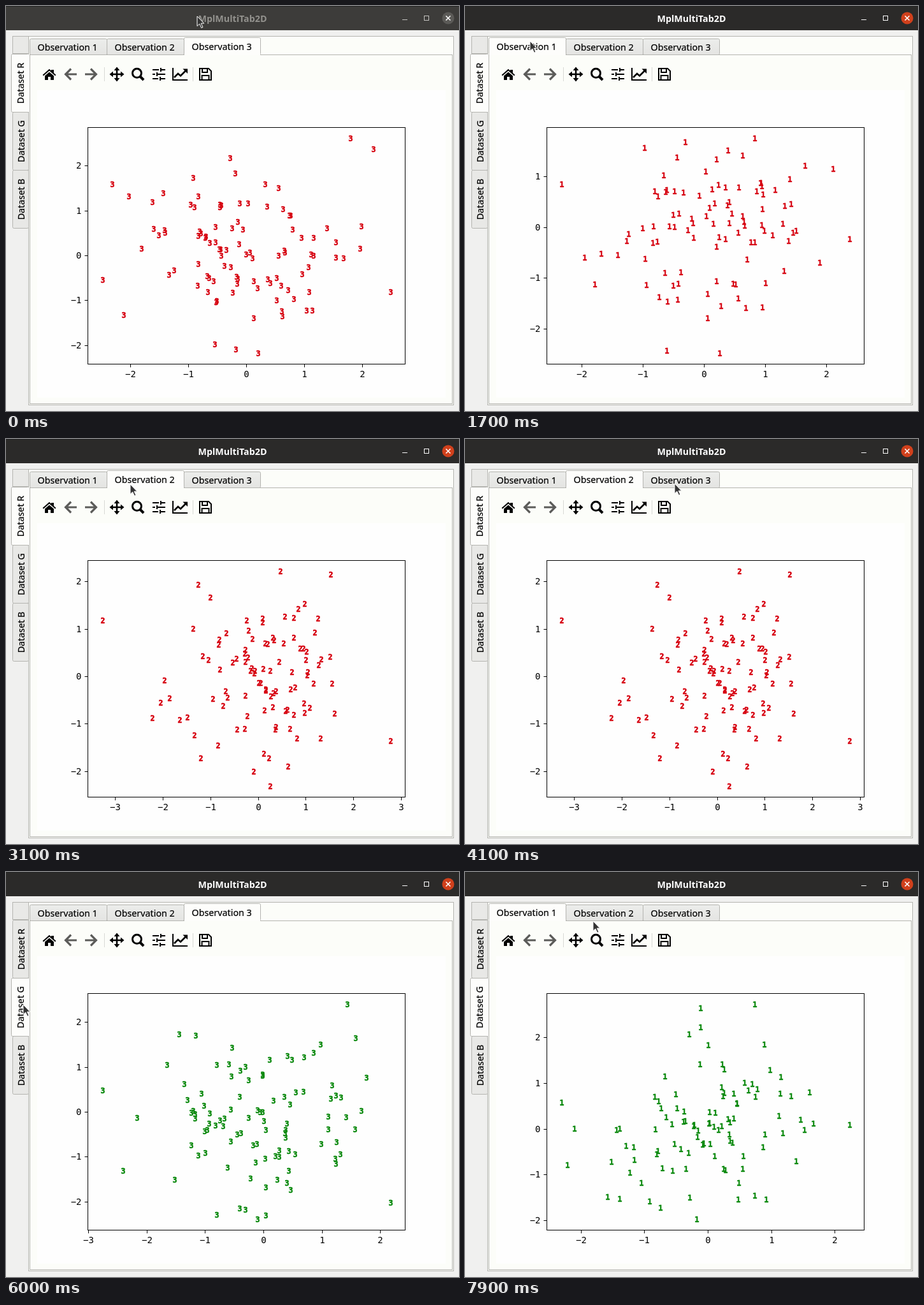
Recreate the animation shown at these times as an HTML page. Size 711 px wide and 635 px high, loop 8 s.

```html
<!DOCTYPE html>
<html lang="en">
<head>
<meta charset="utf-8">
<title>MplMultiTab2D</title>
<style>
  html, body { margin: 0; width: 100%; height: 100%; overflow: hidden; background: #f0f0ef; }
  svg { display: block; }
  text { white-space: pre; }
  .ui { font: 14.3px "Noto Sans", sans-serif; fill: #000; stroke: #000; stroke-width: 0.2; }
  .title { font: bold 14.25px "Noto Sans", sans-serif; text-anchor: middle; }
  .tick { font: 14px "DejaVu Sans Mono", monospace; }
  .mark { font: bold 11.5px "DejaVu Sans Mono", monospace; text-anchor: middle; stroke-width: 0.6; }
  .line { fill: none; stroke: #000; }
</style>
</head>
<body>
<svg width="711" height="635" viewBox="0 0 711 635">
  <defs>
    <linearGradient id="tab" x2="0" y2="1">
      <stop stop-color="#ecedeb"/><stop offset="1" stop-color="#e4e4e2"/>
    </linearGradient>
    <g id="tools">
      <path d="M57.5 108L68 98.8l3 2.6V100h4v5l3.5 3-1.4 1.5L68 101.600l-9.100 7.900z"/>
      <path d="M61 109.600l7-6.100 7 6.100V116h-5v-5h-4v5h-5z"/>
      <path class="line" style="stroke:#5c5c5a;stroke-width:3.2" d="M111 107H94M102 98.500L93.500 107l8.500 8.500M124 107h17M133 98.500l8.500 8.500-8.500 8.500"/>
      <path stroke="#d8d8d4" d="M154.500 96v22M293.500 96v22"/>
      <path class="line" stroke-width="2.600" d="M166 107h16M174 99v16"/>
      <path d="M174 95.500l4.500 5.500h-9zM174 118.500l4.500-5.500h-9zM162.500 107l5.500-4.500v9zM185.500 107l-5.500-4.500v9z"/>
      <circle class="line" cx="205.500" cy="105.300" r="7" stroke-width="3"/>
      <path class="line" stroke-width="4" d="M210.500 110.500l5.500 5.500"/>
      <path class="line" stroke-width="2" d="M230 100h10M244 100h6M230 107h4M238 107h12M230 114h9M243 114h7M243 97v6M237 104v6M242 111v6"/>
      <path class="line" stroke-width="2" d="M262 97v19h23"/>
      <path class="line" stroke-width="2.600" d="M264 112l6-6 4 3.500 8-8"/>
      <path d="M277.500 98.500h7.500v7.500z"/>
      <path class="line" stroke-width="2" d="M304 98h14l4 4v14h-18zM308 98v6h8v-6M307.500 116v-7h11v7"/>
    </g>
  </defs>
  <g id="window"></g>
  <path id="cursor" d="M0 0V15.500L3.700 12 6.700 18.300 9 17.200 6.200 11.200H10.800z" fill="#333" stroke="#fff"/>
</svg>
<script>
const RED = '#d6000f', GREEN = '#07870a', BORDER = 'stroke="#b4b4b0"';
const AXES = { left: 128.5, top: 190.5, right: 626.5, bottom: 561.5 };
// The axes fit the data, so the outermost points always lie on these lines.
const FIT = { left: 152, top: 208, right: 604, bottom: 545 };

// origin and unit are in pixels; ends holds where the left, right, top and bottom points sit on FIT.
const red1 = { mark: '1', color: RED, origin: [375.5, 347.3], unit: [95.9, 79.5], ends: [280, 366, 455, 400] };
const red2 = { mark: '2', color: RED, origin: [396, 372.5], unit: [74.9, 74.3], ends: [285, 474, 431, 415] };
const red3 = { mark: '3', color: RED, origin: [377.5, 391.5], unit: [90.8, 70.3], ends: [430, 449, 541, 396] };
const green3 = { mark: '3', color: GREEN, origin: [404.5, 376.5], unit: [91.7, 70.4], ends: [343, 519, 536, 395] };
const green1 = { mark: '1', color: GREEN, origin: [381.5, 403], unit: [99.7, 71.7], ends: [362, 397, 455, 364] };

const scenes = [
  { start: 0, plot: red3, tab: 2, group: 0, inactive: true },
  { start: 1700, plot: red1, tab: 0, group: 0 },
  { start: 3100, plot: red2, tab: 1, group: 0 },
  { start: 4300, plot: red3, tab: 2, group: 0 },
  { start: 6000, plot: green3, tab: 2, group: 1 },
  { start: 7400, plot: green1, tab: 0, group: 1 },
];

// Pointer strokes; bow is how far the stroke sags below a straight line.
const moves = [
  { from: 400, to: 700, x: 318, y: 103, bow: 0 },
  { from: 800, to: 1500, x: 102, y: 55, bow: 0 },
  { from: 2200, to: 2900, x: 195, y: 71, bow: 13 },
  { from: 3500, to: 4100, x: 329, y: 70, bow: 9 },
  { from: 4800, to: 5700, x: 27, y: 208, bow: 23 },
  { from: 6300, to: 6900, x: 133, y: 69, bow: 0 },
  { from: 7700, to: 7900, x: 201, y: 77, bow: 0 },
];

const text = (cls, x, y, str, extra = '') => `<text class="${cls}" x="${x}" y="${y}" ${extra}>${str}</text>`;
const rect = (x, y, w, h, fill, extra = '') =>
  `<rect x="${x}" y="${y}" width="${w}" height="${h}" fill="${fill}" ${extra}/>`;

function random(seed) {
  return () => (seed = (seed * 16807) % 2147483647) / 2147483647;
}

// Normally distributed points inside the four outermost ones.
function cloud({ origin, unit, ends }) {
  const next = random(ends[0] * ends[1]);
  const points = [[FIT.left, ends[0]], [FIT.right, ends[1]], [ends[2], FIT.top], [ends[3], FIT.bottom]];
  while (points.length < 100) {
    const r = Math.sqrt(-2 * Math.log(next())), a = 2 * Math.PI * next();
    const x = Math.round(origin[0] + unit[0] * r * Math.cos(a));
    const y = Math.round(origin[1] + unit[1] * r * Math.sin(a));
    if (x > FIT.left && x < FIT.right && y > FIT.top && y < FIT.bottom) points.push([x, y]);
  }
  return points;
}

function drawPlot(p) {
  const { left, top, right, bottom } = AXES;
  const marks = cloud(p).map(([x, y]) => text('mark', x, y + 4, p.mark)).join('');
  let out = `<g fill="${p.color}" stroke="${p.color}">${marks}</g>` +
    rect(left, top, right - left, bottom - top, 'none', 'stroke="#000"');
  for (let n = -3; n <= 3; n++) {
    const x = Math.floor(p.origin[0] + n * p.unit[0]) + 0.5;
    const y = Math.floor(p.origin[1] - n * p.unit[1]) + 0.5;
    const label = (n < 0 ? '−' : '') + Math.abs(n);
    if (x >= left && x <= right)
      out += `<path class="line" d="M${x} ${bottom}v5"/>` + text('tick', x, 582, label, 'text-anchor="middle"');
    if (y >= top && y <= bottom)
      out += `<path class="line" d="M${left} ${y}h-5"/>` + text('tick', 118.5, y + 4.5, label, 'text-anchor="end"');
  }
  return out;
}

function drawTitleBar(inactive) {
  const ink = inactive ? '#92918d' : '#fff';
  return rect(0, 0, 711, 38, inactive ? '#3d3c3a' : '#2b2a29') + rect(0, 0, 711, 1, '#222') +
    text('title', 355.5, 25, 'MplMultiTab2D', `fill="${ink}"`) +
    `<g fill="none" stroke="${inactive ? '#c4c3c0' : '#fff'}"><path d="M622 21.5h8"/>` +
    `<rect x="656.5" y="15.5" width="7" height="7"/>` +
    `<circle cx="694" cy="19" r="9.5" fill="${inactive ? '#5b5a57' : '#d0401c'}" stroke="none"/>` +
    `<path stroke="#fff" stroke-width="1.6" d="M690.5 15.5l7 7m0-7l-7 7"/></g>`;
}

function drawTab(i, on) {
  const x = 37.5 + 121 * i, y = on ? 49.5 : 51.5, w = i < 2 ? 121 : 120;
  return rect(x, y, w, 76.5 - y, on ? '#fdfdfb' : 'url(#tab)', BORDER + ' rx="2"') +
    (on ? rect(x + 0.5, 74, w - 1, 3, '#fdfdfb') : '') +
    text('ui', 49.5 + 121 * i, on ? 69 : 70, 'Observation ' + (i + 1));
}

function drawGroup(i, on) {
  const x = on ? 8.5 : 10.5, y = 75.5 + 91 * i;
  return rect(x, y, 35.5 - x, 91, on ? '#fdfdfb' : '#e8e8e6', BORDER + ' rx="2"') +
    (on ? rect(34, y + 0.5, 3, 90, '#fdfdfb') : '') +
    text('ui', 0, 0, 'Dataset ' + 'RGB'[i],
      `text-anchor="middle" transform="translate(${on ? 28 : 29} ${y + 45.5}) rotate(-90)"`);
}

// The selected tab overlaps its neighbours, so it is drawn last.
const drawTabs = (draw, selected) => [0, 1, 2].sort((a, b) => (a === selected) - (b === selected))
  .map(i => draw(i, i === selected)).join('');

const drawScene = s => drawTitleBar(s.inactive) +
  rect(35.5, 47.5, 667, 578, '#fcfdf9', BORDER) +
  rect(37.5, 76.5, 663, 547, '#fcfdf9', BORDER) +
  rect(49, 132, 641, 482, '#fefefe') +
  rect(10.5, 47.5, 25, 27, '#e9e9e7', BORDER) +
  drawTabs(drawGroup, s.group) + drawTabs(drawTab, s.tab) +
  '<use href="#tools"/>' + drawPlot(s.plot);

function pointer(t) {
  let x = 300, y = 16;
  for (const m of moves) {
    if (t <= m.from) break;
    const p = 1 - (1 - Math.min(1, (t - m.from) / (m.to - m.from))) ** 3;
    x += (m.x - x) * p;
    y += (m.y - y) * p + m.bow * Math.sin(Math.PI * p);
  }
  return [Math.round(x), Math.round(y)];
}

const windowLayer = document.getElementById('window'), cursor = document.getElementById('cursor');
let shown;

function frame(now) {
  const t = Math.floor((now % 8000) / 100) * 100;
  const scene = scenes.findLast(s => s.start <= t);
  if (scene !== shown) {
    windowLayer.innerHTML = drawScene(scene);
    shown = scene;
  }
  cursor.setAttribute('transform', `translate(${pointer(t)})`);
  requestAnimationFrame(frame);
}
frame(performance.now());
</script>
</body>
</html>
```
